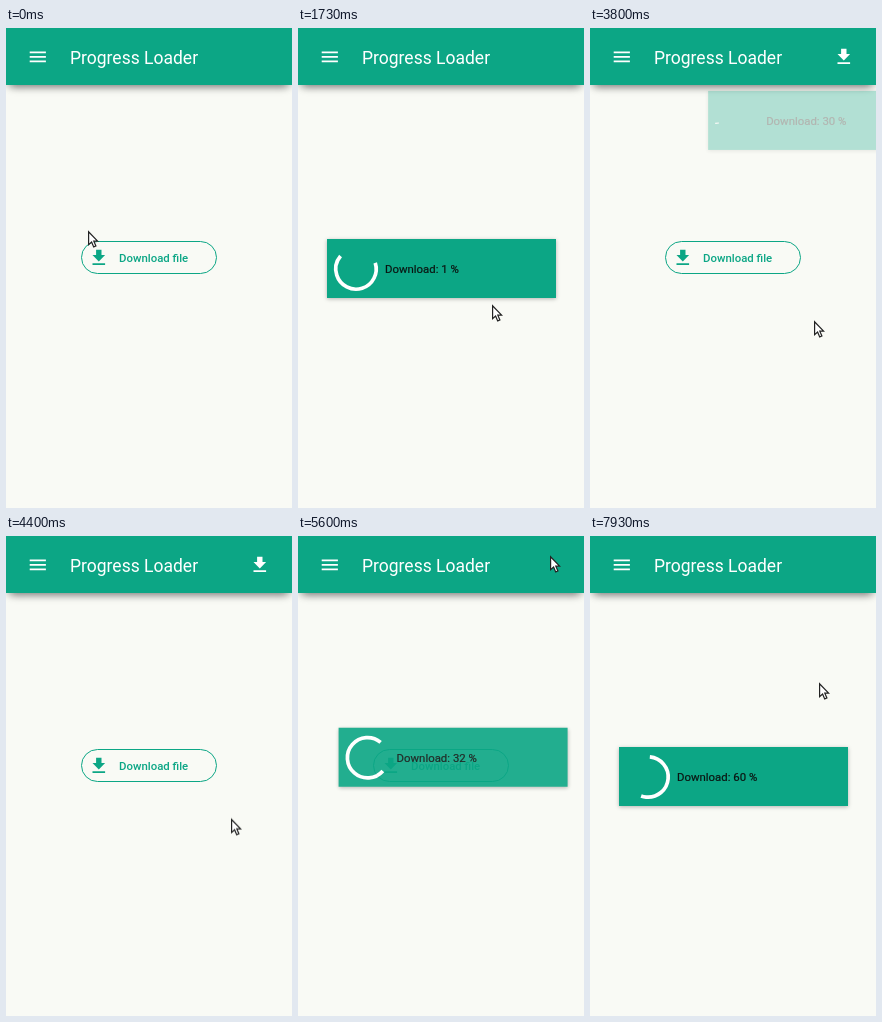
An HTML page for the animation above (8 s loop, 286 by 480 pixels).

```html
<!DOCTYPE html>
<html lang="en">
<head>
<meta charset="utf-8">
<title>Progress Loader</title>
<style>
  html, body { margin: 0; width: 100%; height: 100%; overflow: hidden; }
  body { position: relative; background: #f9faf5; font-family: Roboto, sans-serif; --teal: #0ca685; }
  body > *, .label, .spinner { position: absolute; box-sizing: border-box; }
  svg { overflow: visible; }
  .bar {
    left: 0; top: 0; width: 286px; height: 57px; background: var(--teal);
    box-shadow: 0 7px 8px -5px rgba(0, 0, 0, .42), 0 2px 7px rgba(0, 0, 0, .15);
  }
  .title { left: 64px; top: 19px; font-size: 17.5px; line-height: 22px; color: #fff; white-space: nowrap; }
  .icon { width: 21.6px; height: 21.6px; }
  .menu { left: 21.2px; top: 18.2px; fill: #fff; }
  .tray { left: 243.2px; top: 18.2px; fill: #fff; }
  .button {
    left: 75px; top: 212.5px; width: 136px; height: 33.5px;
    border: 1px solid var(--teal); border-radius: 17px;
  }
  .arrow { left: 82.4px; top: 219px; fill: var(--teal); }
  .caption { left: 113px; top: 223px; font: 500 11.4px/15px Roboto, sans-serif; color: var(--teal); white-space: nowrap; }
  .dialog {
    left: 28.5px; top: 211px; width: 229px; height: 59px; background: var(--teal);
    box-shadow: 0 1px 4px rgba(0, 0, 0, .28);
  }
  .label { left: 58.5px; top: 23px; font-size: 11.4px; line-height: 15px; color: #0b1512; white-space: nowrap; -webkit-text-stroke: .2px; }
  .spinner { left: 29.5px; top: 30px; width: 1px; height: 1px; }
  .spinner circle { fill: none; stroke: #fff; stroke-width: 3.7; }
  .cursor { left: 0; top: 0; width: 11px; height: 17px; fill: #fff; stroke: #222; stroke-width: 1.2; }
</style>
</head>
<body>
<div class="bar"></div>
<svg class="icon menu" viewBox="0 0 24 24"><path d="M3 6h18v2H3zM3 11h18v2H3zM3 16h18v2H3z"/></svg>
<div class="title">Progress Loader</div>
<svg class="icon tray" viewBox="0 0 24 24"><path d="M19 9h-4V3H9v6H5l7 7zM5 18v2h14v-2z"/></svg>
<div class="button"></div>
<svg class="icon arrow" viewBox="0 0 24 24"><path d="M19 9h-4V3H9v6H5l7 7zM5 18v2h14v-2z"/></svg>
<div class="caption">Download file</div>
<div class="dialog">
  <svg class="spinner"><circle r="20.2" pathLength="360"/></svg>
  <div class="label"></div>
</div>
<svg class="cursor" viewBox="0 0 11 17"><path d="M.6.8V13.6L3.6 11 5.7 15.9 7.9 15 5.8 10.2H9.6Z"/></svg>
<script>
const LOOP = 8000;
const SWIFT = 'cubic-bezier(.25, .8, .25, 1)';
const $ = selector => document.querySelector(selector);
const tracks = [];

// rows: [ms, properties, easing towards the next row]
function track(selector, rows) {
  const full = [[0, rows[0][1]], ...rows, [LOOP, rows[rows.length - 1][1]]];
  const frames = full.map(([ms, props, easing = 'linear']) => ({ offset: ms / LOOP, easing, ...props }));
  const animation = $(selector).animate(frames, { duration: LOOP, fill: 'both' });
  animation.pause();
  tracks.push(animation);
}

const home = { opacity: 1, transform: 'none' };
const hidden = { opacity: 0, transform: 'none' };
const away = { opacity: 0, transform: 'translate(127px, -211px)' };
track('.dialog', [
  [1150, hidden, SWIFT], [1580, home],
  [3700, home, SWIFT], [4110, away],
  [5410, away, SWIFT], [5840, home]
]);

const off = { opacity: 0 }, on = { opacity: 1 };
track('.tray', [[3750, off, 'step-end'], [3751, on], [5400, on, 'step-end'], [5401, off]]);

const at = (x, y) => ({ transform: `translate(${x}px, ${y}px)` });
track('.cursor', [
  [30, at(82, 203), 'ease-in-out'], [260, at(156, 231), 'ease-in-out'], [400, at(136, 230)],
  [640, at(136, 230)], [670, at(117, 229)],
  [900, at(117, 229), 'ease-in-out'], [1600, at(194, 277)],
  [1760, at(194, 277), 'ease-in-out'], [2500, at(224, 293)],
  [4340, at(224, 293)], [4400, at(225, 283)], [4650, at(222, 215)],
  [4950, at(244, 60), 'ease-out'], [5200, at(252, 20)],
  [6000, at(252, 20), 'ease-in'], [6230, at(239, 52), 'ease-out'], [6600, at(229, 147)]
]);

// Two spells of the dialog; spin rows: [ms, cycles, turn in degrees]
const spells = [
  { from: 1610, base: 0, limit: 32, spin: [[1730, .467, 72], [2800, 1.252, 265]] },
  { from: 5820, base: 32, limit: 100, spin: [[5600, .5, 220], [6730, 1.533, 396], [7930, 2.423, 635]] }
];
spells[1].spin.forEach(row => row[2] -= 90);

function spinAt(rows, t) {
  let i = 0;
  while (i < rows.length - 2 && t > rows[i + 1][0]) i++;
  const [a, b] = [rows[i], rows[i + 1]];
  const k = (t - a[0]) / (b[0] - a[0]);
  return [1, 2].map(n => a[n] + (b[n] - a[n]) * k);
}

const smooth = p => p * p * p * (10 - 15 * p + 6 * p * p);
const circle = $('.spinner circle');
const label = $('.label');

function draw(t) {
  tracks.forEach(animation => animation.currentTime = t);
  const spell = spells[t < 4800 ? 0 : 1];
  const count = Math.max(0, Math.floor((t - spell.from) / 73));
  label.textContent = `Download: ${Math.min(spell.limit, spell.base + count)} %`;

  // The head runs to three quarters, then the tail catches up.
  const [cycles, turn] = spinAt(spell.spin, t);
  const lap = Math.floor(cycles);
  const value = 1 + 148 * smooth(cycles - lap);
  const tail = Math.max(0, value - 75) * 3.6;
  const length = Math.min(value, 75) * 3.6 - tail;
  circle.setAttribute('stroke-dasharray', `${length} ${360 - length}`);
  circle.setAttribute('transform', `rotate(${turn - 90 * lap + tail - 90})`);
}

const start = performance.now();
function tick() {
  draw((performance.now() - start) % LOOP);
  requestAnimationFrame(tick);
}
tick();
</script>
</body>
</html>
```
